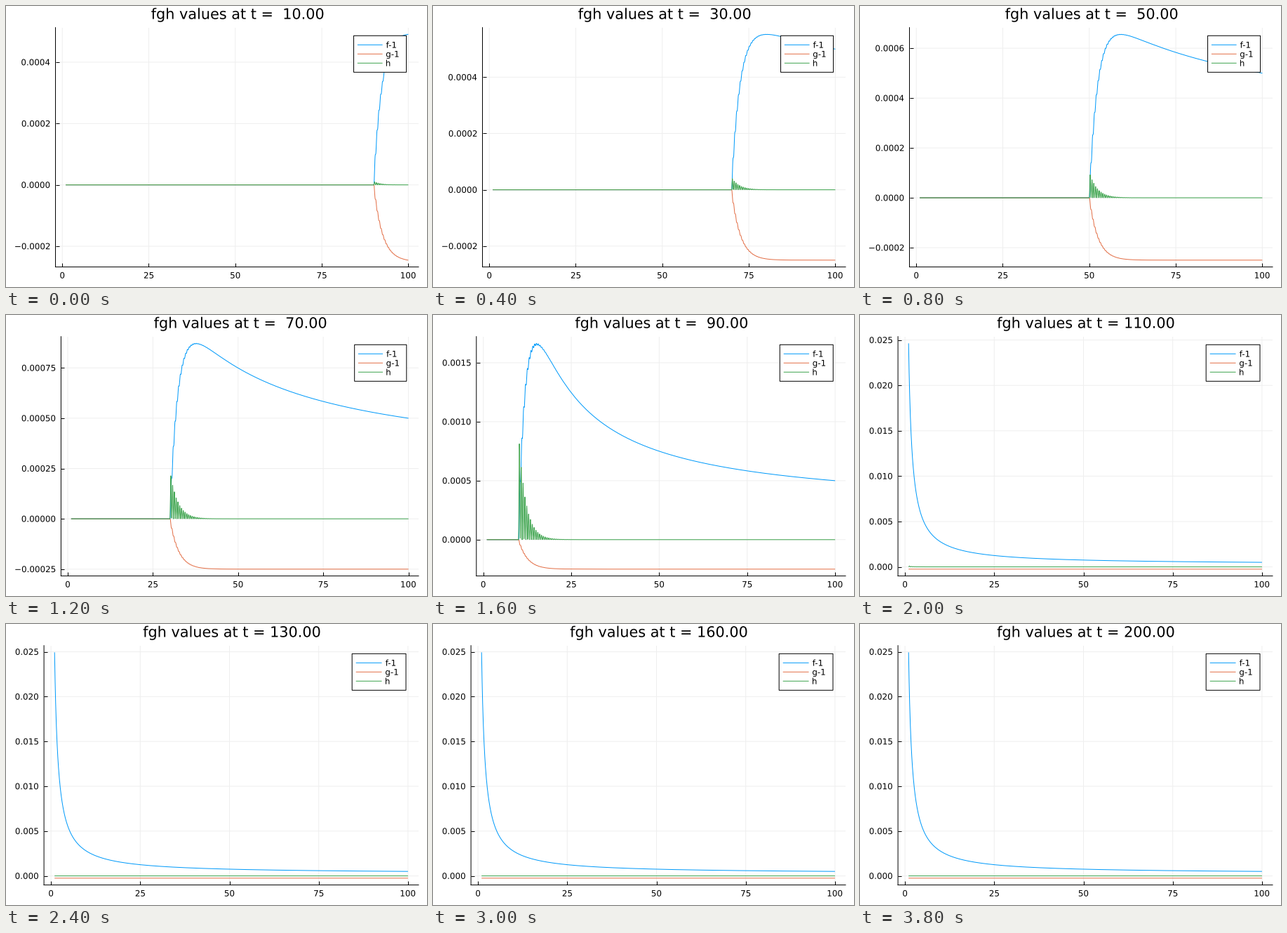
Recreate the animation shown at these times as a matplotlib script. Size 600x400 px, loop 4000 ms.

```python
import numpy as np
import matplotlib.pyplot as plt
from matplotlib.animation import FuncAnimation
from matplotlib.lines import Line2D
from matplotlib.patches import PathPatch, Rectangle
from matplotlib.textpath import TextPath
from matplotlib.transforms import Affine2D

# Lines and glyphs keep their sub-pixel positions.
plt.rcParams.update({"font.family": "DejaVu Sans", "path.snap": False,
                     "lines.solid_joinstyle": "round",
                     "lines.solid_capstyle": "butt"})

W, H, DPI = 600, 400, 100
PX = 72 / DPI                      # points per pixel
TOP, BOTTOM, RIGHT = 30.7, 371.4, 588
BLUE, ORANGE, GREEN = "#009afa", "#e36f47", "#3ea44e"
DECAY, OMEGA = 0.4, 6.0
R = np.linspace(1, 100, 1981)

fig = plt.figure(figsize=(W / DPI, H / DPI), dpi=DPI, facecolor="white")
to_pixels = Affine2D().scale(1, -1).translate(0, H)    # y grows downwards


def absorbed(u):
    """Normalised integral of exp(-DECAY u) sin^2(OMEGA u) from 0 to u."""
    a, b = DECAY, 2 * OMEGA

    def antiderivative(x):
        wave = (b * np.sin(b * x) - a * np.cos(b * x)) / (a * a + b * b)
        return -np.exp(-a * x) * (1 / a + wave) / 2

    start = antiderivative(0.0)
    return (antiderivative(u) - start) / -start


def fields(t):
    """Deviations of f, g and h behind a pulse moving in from r = 100."""
    u = np.maximum(R - (100 - t), 0)
    m = absorbed(u)
    f = np.sqrt(1 + 2 * m * (0.00025 + 0.025 / R)) - 1
    g = -0.00025 * m
    pulse = np.exp(-DECAY * u) * np.sin(OMEGA * u) ** 2
    h = 0.0103 * (1 / R - 0.01) * pulse
    return f, g, h


def scale(t):
    """Tick step, label decimals and left edge of the plot."""
    if t <= 60:
        return 0.0002, 4, 70.5
    if t <= 70:
        return 0.00025, 5, 78.4
    if t <= 90:
        return 0.0005, 4, 61.8
    return (0.002 if t <= 100 else 0.005), 3, 54.1


def padded(lo, hi):
    pad = 0.03 * (hi - lo)
    return lo - pad, hi + pad


def label(x, y, s, size=11.9, align=0.5):
    """Text on baseline y; align 0, 0.5 or 1 puts x left, centre or right."""
    path = TextPath((0, 0), s, size=size)
    box = path.get_extents()
    shift = x - box.x0 - align * box.width
    place = Affine2D().translate(shift, H - y)
    fig.add_artist(PathPatch(path, fc="black", lw=0, transform=place,
                             zorder=12))


def legend(width):
    right = RIGHT - width / 30 - 0.2
    box = 75 + 0.11 * (width - 517.5)
    left, top = right - box, 42.3
    fig.add_artist(Rectangle((left, top), box, 52, fc="white", ec="black",
                             lw=PX, transform=to_pixels, zorder=10))
    rows = (("f-1", BLUE), ("g-1", ORANGE), ("h", GREEN))
    for i, (name, color) in enumerate(rows):
        y = top + 13 * (i + 1)
        fig.add_artist(Line2D([left + 0.0103 * width, left + 0.0793 * width],
                              [y, y], color=color, lw=PX,
                              transform=to_pixels, zorder=11))
        label(left + 0.0895 * width, y + 4.3, name, align=0)


def draw(k):
    fig.clear()
    t = 10 * (k + 1)
    step, decimals, left = scale(t)
    width, height = RIGHT - left, BOTTOM - TOP
    curves = fields(t)
    xlim = padded(R[0], R[-1])
    ylim = padded(min(c.min() for c in curves), max(c.max() for c in curves))

    ax = fig.add_axes([left / W, 1 - BOTTOM / H, width / W, height / H])
    ax.set(xlim=xlim, ylim=ylim, facecolor="none")
    ax.spines[["top", "right"]].set_visible(False)
    ax.spines[["left", "bottom"]].set_linewidth(PX)
    ax.set_axisbelow(True)
    ax.grid(color="#efefef", lw=PX)
    ax.tick_params(direction="in", length=5 * PX, width=PX,
                   labelleft=False, labelbottom=False)

    xticks = np.arange(0, 101, 25)
    yticks = step * np.arange(np.ceil(ylim[0] / step),
                              np.floor(ylim[1] / step) + 1)
    ax.set_xticks(xticks)
    ax.set_yticks(yticks)
    for v in xticks:
        x = left + (v - xlim[0]) / (xlim[1] - xlim[0]) * width
        label(x, 387.6, f"{v}")
    for v in yticks:
        y = BOTTOM - (v - ylim[0]) / (ylim[1] - ylim[0]) * height
        sign = "\u2212" if v < 0 else ""
        label(left - 8.2, y + 4.3, f"{sign}{abs(v):.{decimals}f}", align=1)

    for curve, color in zip(curves, (BLUE, ORANGE, GREEN)):
        ax.plot(R, curve, color=color, lw=PX)

    label((left + RIGHT) / 2 + 0.5, 18.5, f"fgh values at t = {t:6.2f}",
          size=20.8)
    legend(width)
    return []


anim = FuncAnimation(fig, draw, frames=20, interval=200, init_func=lambda: [],
                     repeat=True, repeat_delay=0, blit=False)
plt.show()
```
